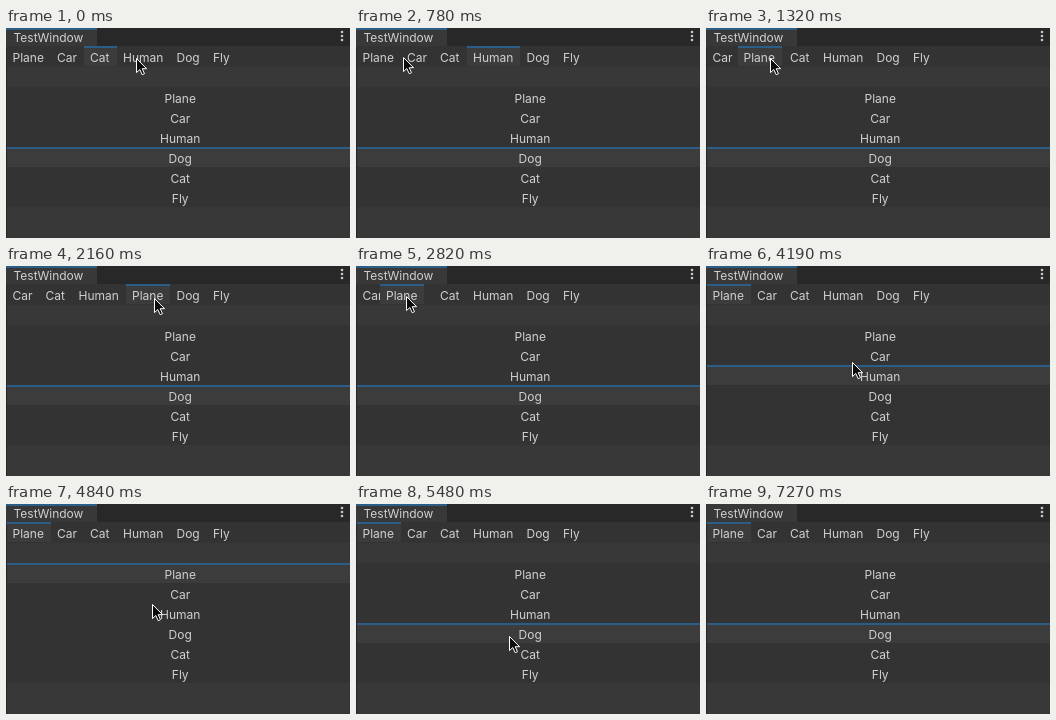
An HTML page with a canvas that plays this animation: 344x210 px, repeating every 7290 ms.

```html
<!DOCTYPE html>
<html lang="en">
<head>
<meta charset="utf-8">
<title>Reorderable tabs</title>
<style>
  html, body { margin: 0; width: 100%; height: 100%; overflow: hidden; background: #383838; }
  canvas { display: block; }
</style>
</head>
<body>
<canvas id="stage" width="344" height="210"></canvas>
<script>
const ctx = document.getElementById('stage').getContext('2d');
const LOOP = 7290, STEP = 60;
const BLUE = '#2c5d87', SHADE = '#333333', LIT = '#3c3c3c', PANEL = '#383838', TEXT = '#d0d0d0';

const TABS_LEFT = 1;
const TAB_WIDTHS = { Plane: 44.5, Car: 33, Cat: 33, Human: 53.5, Dog: 36.5, Fly: 29 };
const ROWS = ['Plane', 'Car', 'Human', 'Dog', 'Cat', 'Fly'];
const DROP_SLOT = TABS_LEFT + TAB_WIDTHS.Car + TAB_WIDTHS.Cat + TAB_WIDTHS.Human;

const CURSOR_START = { x: 130, y: 30 };
const CURSOR_MOVES = [
  { from: 480, to: 1020, x: 21, y: 29 },
  { from: 1200, to: 1920, x: 148, y: 32 },
  { from: 2220, to: 3000, x: 41, y: 30 },
  { from: 3300, to: 3950, x: 149, y: 106 },
  { from: 4130, to: 4480, x: 141, y: 76, power: 1.2 },
  { from: 4720, to: 5250, x: 153, y: 132 },
  { from: 5660, to: 6010, x: 19, y: 136 }
];
const ARROW = new Path2D('M.5 .5V14.6L3.8 11.5L6.2 16.7L8.5 15.7L6.2 10.7H10.6Z');

// The pointer eases out towards each stop, sampled once per step.
function cursorAt(t) {
  let { x, y } = CURSOR_START;
  for (const move of CURSOR_MOVES) {
    if (t < move.from) break;
    const elapsed = (Math.floor((t - move.from) / STEP + 0.001) + 1) * STEP;
    const p = Math.min(1, elapsed / (move.to - move.from + STEP));
    const eased = 1 - (1 - p) ** (move.power || 1.58);
    x += (move.x - x) * eased;
    y += (move.y - y) * eased;
  }
  return { x: Math.round(x), y: Math.round(y) };
}

function planeLeft(t) {
  if (t < 1200 || t >= 2940) return TABS_LEFT;
  if (t < 1980) return cursorAt(t).x - 32;
  if (t < 2220) return DROP_SLOT;
  return cursorAt(t).x - 25.5;
}

function rect(color, x, y, w, h) {
  ctx.fillStyle = color;
  ctx.fillRect(x, y, w, h);
}

function label(text, x, y, align = 'left') {
  ctx.fillStyle = TEXT;
  ctx.textAlign = align;
  ctx.fillText(text, x, y);
}

function highlight(x, y, w, h) {
  rect(LIT, x, y, w, h);
  rect(BLUE, x, y, w, 2);
}

function drawTitle(focused) {
  rect('#282828', 0, 0, 344, 18);
  rect(PANEL, 0, 0, 91, 18);
  if (focused) rect(BLUE, 0, 0, 91, 2);
  label('TestWindow', 7.5, 14);
  ctx.fillStyle = '#c8c8c8';
  for (let y = 4; y <= 12; y += 4) {
    ctx.beginPath();
    ctx.arc(336, y, 1.3, 0, 7);
    ctx.fill();
  }
}

function drawTab(name, x, selected) {
  if (selected) highlight(Math.floor(x), 18, Math.floor(TAB_WIDTHS[name]), 20);
  label(name, x + 5.5, 34);
}

function drawTabs(t) {
  rect(SHADE, 0, 18, 344, 21);
  const selected = t < 120 ? 'Cat' : t < 1200 ? 'Human' : 'Plane';
  const dragX = planeLeft(t);
  const { Plane: planeWidth, ...others } = TAB_WIDTHS;
  let x = TABS_LEFT + planeWidth;
  for (const [name, width] of Object.entries(others)) {
    const passed = dragX + planeWidth / 2 > x;
    drawTab(name, passed ? x - planeWidth : x, name === selected);
    x += width;
  }
  drawTab('Plane', dragX, selected === 'Plane');
}

function drawRows(t) {
  const selected = t < 3950 ? 'Dog' : t < 4660 ? 'Human' : t < 5480 ? 'Plane' : 'Dog';
  rect(SHADE, 0, 59, 344, 120);
  ROWS.forEach((name, i) => {
    if (name === selected) highlight(0, 59 + i * 20, 344, 20);
    label(name, 174.2, 75 + i * 20, 'center');
  });
}

function drawCursor(t) {
  if (t >= 6070) return;
  const { x, y } = cursorAt(t);
  ctx.save();
  ctx.translate(x, y);
  ctx.fillStyle = '#0c0c0c';
  ctx.strokeStyle = '#fff';
  ctx.lineWidth = 1;
  ctx.fill(ARROW);
  ctx.stroke(ARROW);
  ctx.restore();
}

function draw(t) {
  ctx.font = '12px Inter, sans-serif';
  rect(PANEL, 0, 0, 344, 210);
  drawTitle(t < 7270);
  drawTabs(t);
  drawRows(t);
  rect('#262626', 0, 20, 1, 190);
  drawCursor(t);
}

const startTime = performance.now();
function tick() {
  draw((performance.now() - startTime) % LOOP);
  requestAnimationFrame(tick);
}
tick();
</script>
</body>
</html>
```
